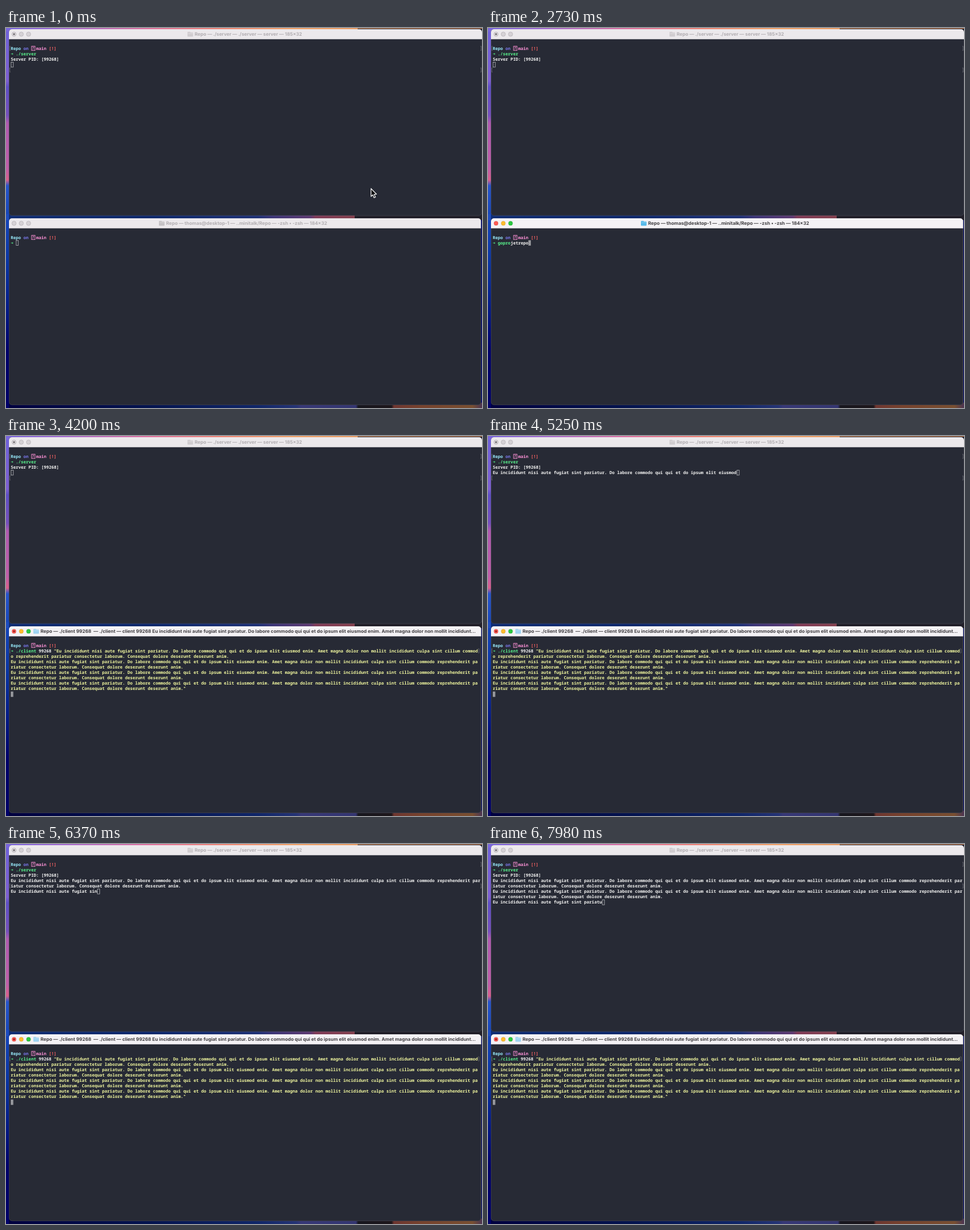
Write an HTML page with a canvas that moves like this. It is 800 px wide and 639 px high and loops after 8000 ms.

```html
<!DOCTYPE html>
<html lang="en">
<head>
<meta charset="utf-8">
<title>Two terminals</title>
<style>
html, body { margin: 0; width: 100%; height: 100%; overflow: hidden; background: #00096b; }
canvas { display: block; }
</style>
</head>
<body>
<canvas id="stage" width="800" height="639"></canvas>
<script>
const ctx = document.getElementById('stage').getContext('2d');
ctx.textRendering = 'geometricPrecision';

const LOOP = 8000, TICK = 70;
const COL = 4.27, ROW = 9.1, LEFT = 8;
const MONO = COL / .6 + 'px "Noto Sans Mono", "DejaVu Sans Mono", monospace';
const TITLE = '700 7.87px Inter, sans-serif';
const WHITE = '#f3f3f2', GREEN = '#5af78e', YELLOW = '#f1f79f', PINK = '#ff92d8';

const PARA = 'Eu incididunt nisi aute fugiat sint pariatur. Do labore commodo qui qui et do ipsum elit eiusmod enim. ' +
  'Amet magna dolor non mollit incididunt culpa sint cillum commodo reprehenderit pariatur consectetur laborum. ' +
  'Consequat dolore deserunt deserunt anim.';
const MESSAGE = [PARA, PARA, PARA, PARA].join('\n');

// Event times in ms
const MOVE = [35, 770], FOCUS = 1050, HIDE = 1960, RECALL = 2730, CLIENT = 3360, RUN = 4130, REPLY = 4760;

function rect(x, y, w, h, color) {
  ctx.fillStyle = color;
  ctx.fillRect(x, y, w, h);
}

function gradient(x, y, w, h, stops) {
  const g = w > h ? ctx.createLinearGradient(x, 0, x + w, 0) : ctx.createLinearGradient(0, y, 0, y + h);
  stops.forEach(([at, color]) => g.addColorStop(at, color));
  rect(x, y, w, h, g);
}

function wallpaper() {
  gradient(0, 0, 6, 639, [[0, '#6f62da'], [.14, '#7d5fd2'], [.155, '#5f4fc6'], [.23, '#7650bd'],
    [.25, '#b05bb0'], [.37, '#c05fa8'], [.4, '#d9608c'], [.415, '#2755cb'], [.5, '#1645b8'],
    [.62, '#0a35a3'], [.75, '#041885'], [.85, '#00006a'], [1, '#000068']]);
  gradient(0, 0, 800, 6, [[0, '#7866dc'], [.12, '#a36bd0'], [.3, '#e0729f'], [.45, '#ef8576'],
    [.6, '#f2a269'], [.8, '#e59a62'], [1, '#d68c5c']]);
  rect(591, 1, 209, 5, '#201e28');
  gradient(0, 313, 800, 10, [[0, '#1d4cc0'], [.3, '#1743b3'], [.53, '#3452c4'], [.56, '#6559c6'],
    [.64, '#9c61bd'], [.65, '#d56392'], [.732, '#dc6c83'], [.733, '#211f29'], [1, '#211f29']]);
  gradient(0, 630, 800, 9, [[0, '#000069'], [.3, '#062083'], [.53, '#1a3fae'], [.61, '#3d55c3'],
    [.62, '#5a5cc5'], [.735, '#5658bd'], [.74, '#252431'], [.81, '#30242c'], [.815, '#b8594f'],
    [.87, '#c56d4b'], [.98, '#c98350'], [1, '#7d5688']]);
  // Window shadows
  rect(5, 313, 581, 10, '#0006');
  rect(5, 630, 795, 9, '#0006');
}

function folder(x, y, color) {
  ctx.fillStyle = color;
  ctx.beginPath();
  ctx.roundRect(x, y - 4, 5, 3, 1);
  ctx.roundRect(x, y - 3, 9.5, 7, 1);
  ctx.fill();
  rect(x + .5, y - 1.5, 8.5, .6, '#ffffff70');
}

function frame(y, w, h, active, edited) {
  ctx.save();
  ctx.beginPath();
  ctx.roundRect(5, y, w, h, 5);
  ctx.clip();
  rect(5, y, w, h, '#272a35');
  rect(5, y, w, 17, active ? '#f4f2f5' : '#ece9ec');
  ctx.restore();
  ctx.strokeStyle = '#50525c';
  ctx.lineWidth = .5;
  ctx.beginPath();
  ctx.roundRect(5.25, y + 17, w - .5, h - 17.25, [0, 0, 5, 5]);
  ctx.stroke();

  const lights = active ? ['#fb5a54', '#fdbc2e', '#2bc840'] : Array(3).fill('#d6d2d6');
  lights.forEach((color, i) => {
    ctx.beginPath();
    ctx.arc(13.5 + 12.2 * i, y + 8.4, 3.6, 0, 7);
    ctx.fillStyle = color;
    ctx.fill();
    ctx.lineWidth = .7;
    ctx.strokeStyle = active ? '#0002' : '#b3afb3';
    ctx.stroke();
  });
  if (edited) {
    ctx.beginPath();
    ctx.arc(13.5, y + 8.4, 1.3, 0, 7);
    ctx.fillStyle = active ? '#7d1712' : '#5c595c';
    ctx.fill();
  }
}

function title(text, x, y, active, iconColor) {
  folder(x - 12, y, iconColor);
  ctx.font = TITLE;
  ctx.fillStyle = active ? '#403e42' : '#b1adb1';
  ctx.fillText(text, x, y + 2.8);
}

// Terminal grid drawing, with y as the centre of the first row
function print(text, col, row, y, color, weight = 600) {
  ctx.font = weight + ' ' + MONO;
  ctx.fillStyle = color;
  ctx.fillText(text, LEFT + col * COL, y + row * ROW + 2.4);
}

function prompt(y) {
  print('Repo', 0, 0, y, '#9aedfe', 700);
  print('on', 5, 0, y, '#7b78ee', 700);
  print('main', 10, 0, y, PINK, 700);
  print('[!]', 15, 0, y, '#ff6464', 700);
  ctx.strokeStyle = PINK;
  ctx.lineWidth = .9;
  ctx.strokeRect(43, y - 3.5, 5.8, 7);
  ctx.font = '700 6px "Noto Sans Mono", monospace';
  ctx.fillStyle = PINK;
  ctx.fillText('?', 44.1, y + 2.2);
  print('➜', 0, 1, y, GREEN);
}

function block(col, row, y, filled) {
  const x = LEFT + col * COL, top = y + row * ROW - 4.4;
  if (filled) return rect(x, top, 4.3, 9, '#96979c');
  ctx.strokeStyle = '#b4b5b9';
  ctx.lineWidth = .8;
  ctx.strokeRect(x + .5, top + .4, 3.7, 8.3);
}

function marks(y, right) {
  ctx.strokeStyle = '#777981';
  ctx.lineWidth = .7;
  ctx.beginPath();
  for (const [x, d] of [[6.4, 1.3], [right, -1.3]]) {
    ctx.moveTo(x + d, y - 3.5);
    ctx.lineTo(x, y - 3.5);
    ctx.lineTo(x, y + 3.5);
    ctx.lineTo(x + d, y + 3.5);
  }
  ctx.stroke();
}

// Prints wrapped text and returns the cell after the last character
function flow(text, col, row, y, columns, color) {
  text.split('\n').forEach((line, i) => {
    if (i) { col = 0; row++; }
    while (line.length > columns - col) {
      const room = columns - col;
      print(line.slice(0, room), col, row++, y, color);
      line = line.slice(room);
      col = 0;
    }
    print(line, col, row, y, color);
    col += line.length;
  });
  return [col, row];
}

function sent(t) {
  if (t < REPLY) return 0;
  const n = t < 6370 ? 96 + (t - 5250) * 191 / 1120 : 287 + (t - 6370) * 262 / 1610;
  return Math.round(n);
}

function server(t) {
  const y = 34.2;
  frame(2, 795, 313.5, false, true);
  title('Repo — ./server — ./server — server — 185×32', 317, 10.4, false, '#d0cccf');
  prompt(y);
  print('./server', 2, 1, y, GREEN);
  print('Server PID: [99268]', 0, 2, y, WHITE);
  const [col, row] = flow(MESSAGE.slice(0, sent(t)), 0, 3, y, 185, WHITE);
  block(col, row, y, false);
  marks(y, 798.6);
  marks(y + 4 * ROW, 798.6);
}

function client(t) {
  const y = 352.2, active = t >= FOCUS, running = t >= RUN;
  frame(320, 793.5, 314, active, running);
  if (running) {
    title('Repo — ./client 99268  — ./client — client 99268 ' + PARA.slice(0, 141) + '...', 58, 328.4, true, '#9dd3f2');
  } else {
    title('Repo — thomas@desktop-1 — ..minitalk/Repo — -zsh • -zsh — 184×32', 269, 328.4, active,
      active ? '#55b9ea' : '#c4c1c4');
  }
  prompt(y);

  if (t < RECALL) return block(2, 1, y, active);
  if (t < CLIENT) {
    const lit = t < RECALL + TICK ? 5 : 12, word = 'goprojetrepo';
    print(word.slice(0, lit), 2, 1, y, GREEN);
    print(word.slice(lit), 2 + lit, 1, y, WHITE);
    return block(14, 1, y, true);
  }
  print('./client', 2, 1, y, GREEN);
  print('99268', 11, 1, y, WHITE);
  flow('"' + MESSAGE + '"', 17, 1, y, 184, YELLOW);
  if (running) {
    block(0, 9, y, true);
    marks(y + ROW, 795);
  } else {
    block(86, 2, y, true);
  }
}

function pointer(t) {
  if (t >= HIDE) return;
  const p = Math.min(1, Math.max(0, (t - MOVE[0]) / (MOVE[1] - MOVE[0])));
  const e = p * p * (3 - 2 * p);
  ctx.save();
  ctx.translate(613.5 - 292 * e, 270 + 180 * e);
  ctx.beginPath();
  [[0, 0], [0, 13.2], [3, 10.5], [5, 15.5], [7.4, 14.4], [5.3, 9.7], [9.2, 9.5]]
    .forEach(([x, y]) => ctx.lineTo(x, y));
  ctx.closePath();
  ctx.fillStyle = '#08080a';
  ctx.strokeStyle = '#f4f4f4';
  ctx.lineWidth = 1.2;
  ctx.lineJoin = 'round';
  ctx.fill();
  ctx.stroke();
  ctx.restore();
}

function draw(now) {
  const t = Math.floor(now % LOOP / TICK) * TICK;
  wallpaper();
  server(t);
  client(t);
  pointer(t);
  requestAnimationFrame(draw);
}
requestAnimationFrame(draw);
</script>
</body>
</html>
```
